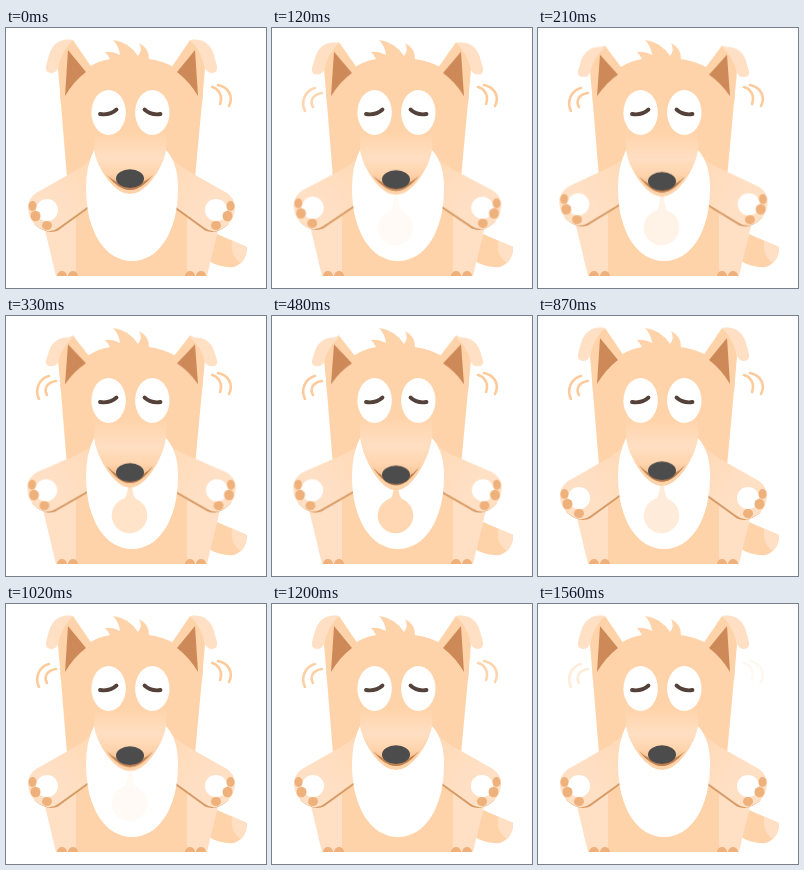
Recreate the animation shown at these times as an HTML page without scripts. Size 260 by 260 pixels, loop 1620 ms.

```html
<!DOCTYPE html>
<html lang="en">
<head>
<meta charset="utf-8">
<title>Meditating dog</title>
<style>
  html, body { margin: 0; width: 100%; height: 100%; overflow: hidden; background: #fff; }
  svg { display: block; width: 100%; height: 100%; }

  .fur { fill: #ffd3a9; }
  .pale { fill: #ffe0c5; }
  .pad { fill: #efb17b; }
  .white { fill: #fff; }
  .line { fill: none; stroke-linecap: round; }
  .lid { stroke: #54423a; stroke-width: 3.8; }
  .wave { stroke: #fdcb9b; stroke-width: 2.6; }

  .ear, .flap, .arm, .muzzle, .nose, .breath, .wave {
    animation: 1620ms ease-in-out infinite;
  }
  .ear { transform-origin: 60px 70px; animation-name: ear; }
  .flap { animation-name: flap; }
  .arm { transform-origin: 80px 152px; animation-name: arm; }
  .muzzle { transform-origin: 124px 125px; animation-name: muzzle; }
  .nose { animation-name: nose; }
  .breath { animation-name: breath; }
  .wave { animation-timing-function: linear; }
  .wave.left { animation-name: wave-left; }
  .wave.right { animation-name: wave-right; }

  /* Ears and arms: quick stretch, then back to rest */
  @keyframes ear {
    0%, 53.7%, 100% { transform: none; }
    20%, 35% { transform: scaleY(.87); }
  }
  @keyframes flap {
    0%, 53.7%, 100% { transform: none; }
    20%, 35% { transform: translateY(2.5px); }
  }
  @keyframes arm {
    0%, 53.7%, 100% { transform: none; }
    20%, 35% { transform: translate(2px, -3.5px) rotate(6deg); }
  }

  /* Muzzle and belly: slow breath */
  @keyframes muzzle {
    0%, 72%, 100% { transform: none; }
    33.3%, 35% { transform: scaleY(1.2); }
  }
  @keyframes nose {
    0%, 72%, 100% { transform: none; }
    33.3%, 35% { transform: translateY(8.5px); }
  }
  @keyframes breath {
    0%, 72%, 100% { opacity: 0; }
    33.3%, 35% { opacity: 1; }
  }

  /* Waves fade out, then jump to their starting state */
  @keyframes wave-left {
    0%, 1.8%, 99.8%, 100% { opacity: 0; }
    9%, 70% { opacity: 1; }
    96.3%, 99.7% { opacity: .38; }
  }
  @keyframes wave-right {
    0%, 68%, 99.8%, 100% { opacity: 1; }
    96.3%, 99.7% { opacity: .13; }
  }
</style>
</head>
<body>
<svg viewBox="0 0 260 260">
  <defs>
    <linearGradient id="snout" gradientUnits="userSpaceOnUse" x1="0" y1="104" x2="0" y2="162">
      <stop offset="0" stop-color="#ffd3a9"/>
      <stop offset=".45" stop-color="#ffdfc3"/>
      <stop offset=".72" stop-color="#ffd4ac"/>
      <stop offset=".88" stop-color="#f2bd8d"/>
      <stop offset="1" stop-color="#c5824c"/>
    </linearGradient>
    <linearGradient id="sleeve" gradientUnits="userSpaceOnUse" x1="84" y1="140" x2="46" y2="172">
      <stop offset="0" stop-color="#ffdab8"/>
      <stop offset="1" stop-color="#ffe0c5"/>
    </linearGradient>

    <g id="ear">
      <path class="fur" d="M67 12L86 40Q84 60 60 76L55 76L52 40Q55 18 67 12Z"/>
      <path fill="#cd8a58" d="M62 22L80 44Q68 53 59 68Z"/>
    </g>
    <path id="flap" class="pale" d="M67 12C56 10 47 14 43 27L40 38Q39 45 45 45Q50 45 52 40Q56 22 67 12Z"/>

    <g id="arm">
      <path class="line" stroke="#d79b66" stroke-width="2.6" d="M30 196Q42 206 52 201L83 178.500"/>
      <path fill="url(#sleeve)" d="M88 126Q83 136 60 148L30 165Q21 171 22 182Q25 199 41 203Q47 204 52 200L84 177Z"/>
      <circle class="white" cx="41" cy="182" r="11"/>
      <g class="pad">
        <ellipse cx="26.500" cy="178" rx="4" ry="5"/>
        <ellipse cx="29.500" cy="188" rx="5" ry="5.200"/>
        <ellipse cx="41" cy="197.500" rx="5" ry="4.600"/>
      </g>
    </g>

    <g id="leg">
      <path class="pale" d="M37 194L50 248H70V180Z"/>
      <path class="pad" d="M51 248a5 5 0 0 1 10 0ZM62 248a5 5 0 0 1 10 0Z"/>
    </g>
  </defs>

  <rect class="white" width="260" height="260"/>

  <path class="fur" d="M211 206L241 219Q241 234 228 239Q214 240 203 233Z"/>
  <path class="pale" d="M226 212.500L241 219Q241 229 235 235Q224 228 226 212.500Z"/>

  <path class="fur" d="M54 64L83 39Q92 33 104 31Q102 27 99 24Q107 23 114 27Q113 18 107 12Q123 14 132 28Q137 22 133 15Q143 20 143 31Q157 33 168 39L197 64L189 150L181 200V248H70V200L61 150Z"/>

  <g>
    <use href="#leg"/>
    <g class="ear"><use href="#ear"/><use class="flap" href="#flap"/></g>
    <g class="arm"><use href="#arm"/></g>
  </g>
  <g transform="translate(251) scale(-1 1)">
    <use href="#leg"/>
    <g class="ear"><use href="#ear"/><use class="flap" href="#flap"/></g>
    <g class="arm"><use href="#arm"/></g>
  </g>

  <path class="white" d="M88 122Q80 138 80 160C80 205 100 233 126 233C152 233 172 205 172 160Q172 135 160 122Z"/>
  <g class="breath" fill="#ffd8b2">
    <circle cx="123.500" cy="199.500" r="17.800"/>
    <path d="M122 168h4q0 12 6 18h-16q6-6 6-18Z"/>
  </g>

  <g class="muzzle">
    <path class="fur" d="M88 118Q90 137 102 152Q113 166 124 166Q135 166 146 152Q158 137 160 118Z"/>
    <path fill="url(#snout)" d="M88 104V122Q90 135 98 145Q112 162 124 162Q136 162 150 145Q158 135 160 122V104Z"/>
    <path fill="#c08050" d="M101 147Q113 162 124 162Q135 162 147 147Q137 157 124 157Q111 157 101 147Z"/>
  </g>
  <ellipse class="nose" fill="#4d4c4c" cx="124" cy="150.600" rx="14" ry="9.400"/>

  <g class="white">
    <ellipse cx="102.600" cy="84.500" rx="17.200" ry="22.500"/>
    <ellipse cx="146.300" cy="84.500" rx="17.200" ry="22.500"/>
  </g>
  <path class="line lid" d="M94 86Q104 87.500 110.500 81.500M138.500 81.500Q145 87.500 154.500 86"/>

  <path class="line wave left" d="M43 60C34 62 28 73 33 83M50 65C42 66 37 72 41 79"/>
  <path class="line wave right" d="M206 59C213 61 217 68 214 76M212 57C222 59 228 68 223 78"/>
</svg>
</body>
</html>
```
